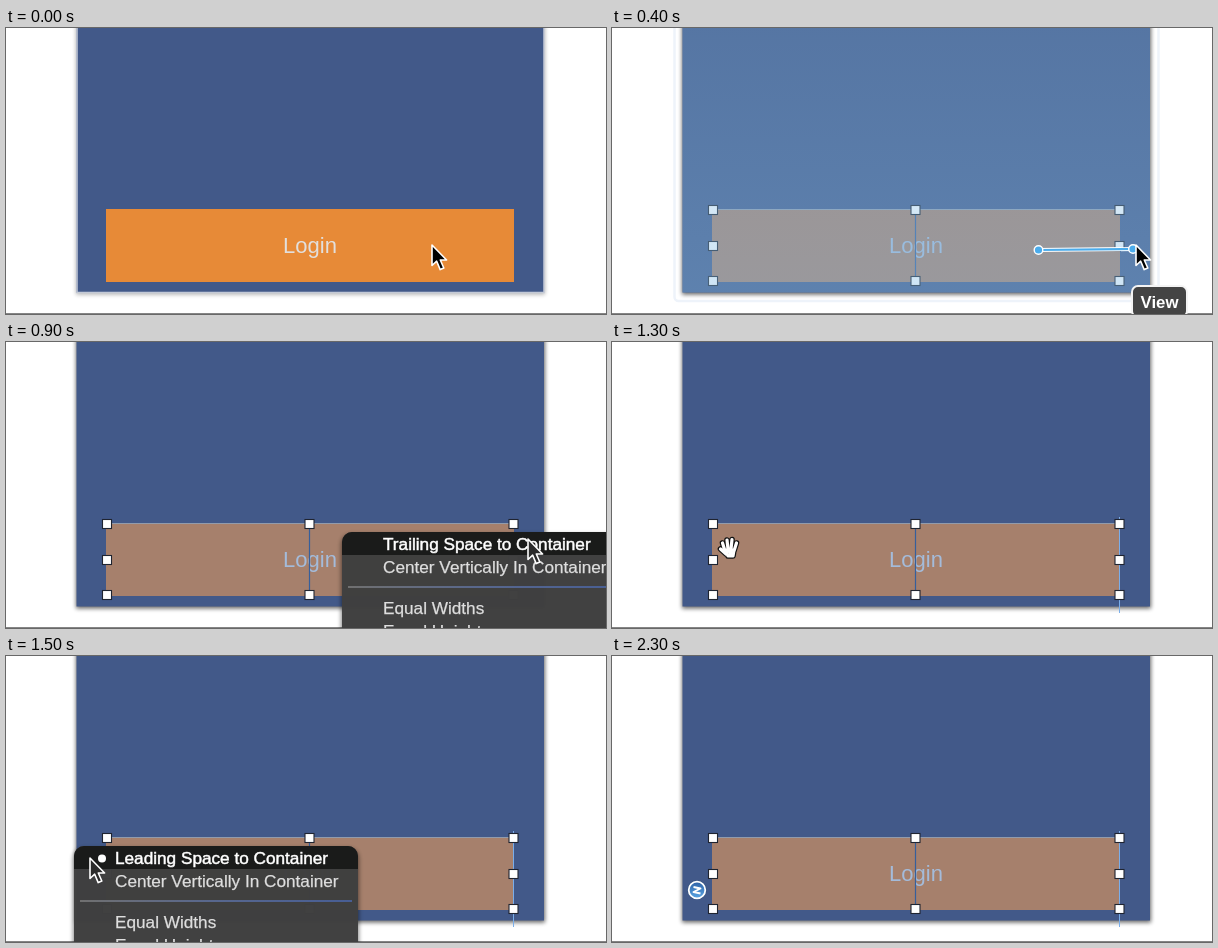
Recreate the animation shown at these times as an HTML page. Size 600 by 286 pixels, loop 2.4 s.

```html
<!DOCTYPE html>
<html lang="en">
<head>
<meta charset="utf-8">
<title>Adding constraints to a button</title>
<style>
  html, body { margin: 0; width: 100%; height: 100%; overflow: hidden; background: #fff; }
  svg { display: block; width: 600px; height: 286px; }
  text { font-family: "Liberation Sans", Arial, sans-serif; }
  .item { font-size: 17.2px; fill: #dedede; stroke: #dedede; stroke-width: .25; }
  .item.on { fill: #fff; stroke: #fff; stroke-width: .5; }
  .tip { font-size: 16.8px; font-weight: bold; fill: #fff; text-anchor: middle; }
</style>
</head>
<body>
<svg viewBox="0 0 600 286" xmlns="http://www.w3.org/2000/svg">
  <defs>
    <linearGradient id="tint" x1="0" y1="0" x2="0" y2="1">
      <stop offset="0" stop-color="#87bee6" stop-opacity=".04"/>
      <stop offset="1" stop-color="#87bee6" stop-opacity=".4"/>
    </linearGradient>
    <linearGradient id="rule">
      <stop offset="0" stop-color="#808080"/>
      <stop offset=".5" stop-color="#5f74a8"/>
      <stop offset="1" stop-color="#4a68b0"/>
    </linearGradient>
    <linearGradient id="disc" x1="0" y1="0" x2="0" y2="1">
      <stop offset="0" stop-color="#2f62a6"/>
      <stop offset="1" stop-color="#5aa6e4"/>
    </linearGradient>
    <filter id="soft" x="-20%" y="-20%" width="140%" height="140%"><feGaussianBlur stdDeviation="2.2"/></filter>
    <clipPath id="menuShape"><rect width="284" height="130" rx="10"/></clipPath>
  </defs>

  <rect width="600" height="286" fill="#fff"/>
  <rect id="shadow" x="70" y="-20" width="469" height="286.5" filter="url(#soft)"/>
  <rect x="70.5" y="-20" width="467.5" height="284.5" fill="#425989"/>
  <path id="edge" d="M71 0V264.5H538V0" fill="none" stroke="#c3c9d6" stroke-width="1.5"/>
  <rect y="285" width="600" height="1" fill="#858585"/>
  <rect id="button" x="100" y="181" width="408" height="73"/>
  <text id="label" x="304" y="225" font-size="22" text-anchor="middle">Login</text>

  <g id="selection">
    <path d="M100 181.5H508" stroke="#8ca2bd" stroke-width=".8"/>
    <path d="M303.5 182V253" stroke="#365f9c" stroke-width="1.2"/>
    <path id="constraint" d="M507.5 175V271" stroke="#7aaeea" stroke-width="1"/>
    <g id="handles" fill="#fff" stroke="#1f2430" stroke-width="1.1"></g>
  </g>

  <g id="target">
    <rect id="wash" fill="url(#tint)"/>
    <rect id="outline" rx="4" fill="none" stroke="#eef3fa" stroke-width="2.5"/>
    <g id="tip">
      <rect id="tipBox" y="-15.5" height="31" rx="6" fill="#444" stroke="#f4f4f4" stroke-width="2"/>
      <text id="tipText" class="tip" y="6"></text>
    </g>
  </g>

  <g id="drag" stroke-linecap="round">
    <path id="dragBack" stroke="#fff" stroke-width="4"/>
    <path id="dragLine" stroke="#4bacec" stroke-width="2.2"/>
    <circle id="dragFrom" r="4.3" fill="#4bacec" stroke="#fff" stroke-width="1.4"/>
    <circle id="dragTo" r="4.3" fill="#4bacec" stroke="#fff" stroke-width="1.4"/>
  </g>

  <g id="menu">
    <rect x="-1" y="2" width="286" height="130" rx="10" opacity=".45" filter="url(#soft)"/>
    <g clip-path="url(#menuShape)">
      <rect width="284" height="130" fill="#404040" opacity=".975"/>
      <rect id="highlight" width="284" height="23" fill="#1a1b1a"/>
    </g>
    <path d="M6 54.2H278V55.8H6Z" fill="url(#rule)"/>
    <circle id="bullet" cx="28" cy="12.5" r="4" fill="#fff"/>
    <text id="first" class="item" x="41" y="18"></text>
    <text id="second" class="item" x="41" y="41">Center Vertically In Container</text>
    <text class="item" x="41" y="82">Equal Widths</text>
    <text class="item" x="41" y="105">Equal Heights</text>
  </g>

  <path id="arrow" d="M0 0V20.5L4.7 16.2L8.2 24.6L11.8 23L8.3 15H14.6Z"
        stroke="#fff" stroke-width="1.6" stroke-linejoin="round"/>
  <g id="hand" fill="none" stroke-linecap="round" stroke-linejoin="round">
    <path d="M-4 3L-6.5-5M-1 1L-2-8M2 1L3-8.5M5 3L7.5-5M-3 6L-8.5 1M-3 2H5L4 8H-1Z" stroke="#111" stroke-width="5.6"/>
    <path d="M-4 3L-6.5-5M-1 1L-2-8M2 1L3-8.5M5 3L7.5-5M-3 6L-8.5 1M-3 2H5L4 8H-1Z" stroke="#fff" stroke-width="3.2"/>
    <path d="M-2 2H4L3 7H0Z" fill="#fff"/>
  </g>
  <g id="badge">
    <circle r="9.8" fill="#35527f"/>
    <circle r="8.3" fill="url(#disc)" stroke="#fff" stroke-width="1.8"/>
    <path d="M-3.5-3L3.5-1.5L-3.5 2L3.5 3.5" fill="none" stroke="#fff" stroke-width="1.9" stroke-linejoin="round"/>
  </g>
</svg>
<script>
const LOOP = 2400, STEP = 100;
const el = id => document.getElementById(id);
const set = (id, attrs) => {
  for (const name in attrs) el(id).setAttribute(name, attrs[name]);
};
const show = (id, on) => set(id, { visibility: on ? "visible" : "hidden" });
const move = (id, x, y) => set(id, { transform: `translate(${x} ${y})` });

// Pointer path: time, x, y
const path = [
  [0, 426, 217], [100, 426, 217], [300, 497, 218], [400, 524, 217], [500, 522, 216],
  [700, 522, 216], [800, 522, 197], [1000, 522, 197], [1200, 117, 206], [1300, 117, 206],
  [1400, 84, 204], [1500, 84, 202], [1800, 84, 203], [2200, 85, 234], [2400, 85, 234]
];

const buttonTarget = { x: 100, y: 181, w: 408, h: 73, name: "Button - Login", tipWidth: 132 };
const viewTarget = { x: 70.5, y: -560, w: 467.5, h: 824.5, name: "View", tipWidth: 55 };

for (const y of [182, 218, 253]) {
  for (const x of [101, 303.5, 507.5]) {
    if (y === 218 && x === 303.5) continue;
    const box = document.createElementNS("http://www.w3.org/2000/svg", "rect");
    el("handles").append(box);
    for (const [k, v] of Object.entries({ x: x - 4.5, y: y - 4.5, width: 9, height: 9 })) box.setAttribute(k, v);
  }
}

function pointerAt(t) {
  const i = path.findIndex(p => p[0] > t);
  const [t0, x0, y0] = path[i - 1], [t1, x1, y1] = path[i];
  const k = (t - t0) / (t1 - t0);
  return [x0 + (x1 - x0) * k, y0 + (y1 - y0) * k];
}

function drawTarget(target) {
  show("target", target);
  if (!target) return;
  const { x, y, w, h, name, tipWidth } = target;
  set("wash", { x, y, width: w, height: h });
  set("outline", { x: x - 8, y: y - 8.5, width: w + 16.5, height: h + 17 });
  move("tip", x + w + 9.5, y + h + 9);
  set("tipBox", { x: -tipWidth / 2, width: tipWidth });
  el("tipText").textContent = name;
}

function drawDrag(from, to) {
  show("drag", from);
  if (!from) return;
  const d = `M${from}L${to}`;
  set("dragBack", { d });
  set("dragLine", { d });
  move("dragFrom", ...from);
  move("dragTo", ...to);
}

function drawMenu(x, first, row, opacity) {
  move("menu", x, 190);
  set("menu", { opacity });
  set("highlight", { y: row * 23 });
  el("first").textContent = first;
  set("first", { class: row === 0 ? "item on" : "item" });
  set("second", { class: row === 1 ? "item on" : "item" });
}

function draw(time) {
  const t = Math.floor((time % LOOP) / STEP) * STEP;
  const during = (from, to) => t >= from && t < to;
  const [x, y] = pointerAt(t);
  const selected = t >= 100;
  const rightMenu = during(500, 1100), leftMenu = during(1500, 2200);

  set("shadow", { opacity: selected ? .6 : .3 });
  show("edge", !selected);
  set("button", { fill: selected ? "#a6806c" : "#e78a37" });
  set("label", { fill: selected ? "#a4bbda" : "#e2dfdc" });
  show("selection", selected);
  show("constraint", t >= 1100);

  drawTarget(during(200, 400) ? buttonTarget : t === 400 || t === 1400 ? viewTarget : null);
  const start = during(200, 500) ? [426.5, 222] : t === 1400 ? [117, 206] : null;
  drawDrag(start, [x - 3, y + 4]);

  show("menu", rightMenu || leftMenu);
  show("bullet", leftMenu);
  if (rightMenu) drawMenu(336, "Trailing Space to Container", t < 800 ? 1 : 0, 1);
  if (leftMenu) drawMenu(68, "Leading Space to Container", 0, t < 2100 ? 1 : .5);

  const hand = during(1200, 1400), badge = t >= 2200;
  show("hand", hand);
  show("badge", badge);
  show("arrow", !hand && !badge);
  set("arrow", { fill: rightMenu || leftMenu ? "#2b2b2b" : "#000" });
  for (const id of ["hand", "badge", "arrow"]) move(id, x, y);
}

const began = performance.now();
function tick() {
  draw(performance.now() - began);
  requestAnimationFrame(tick);
}
tick();
</script>
</body>
</html>
```
